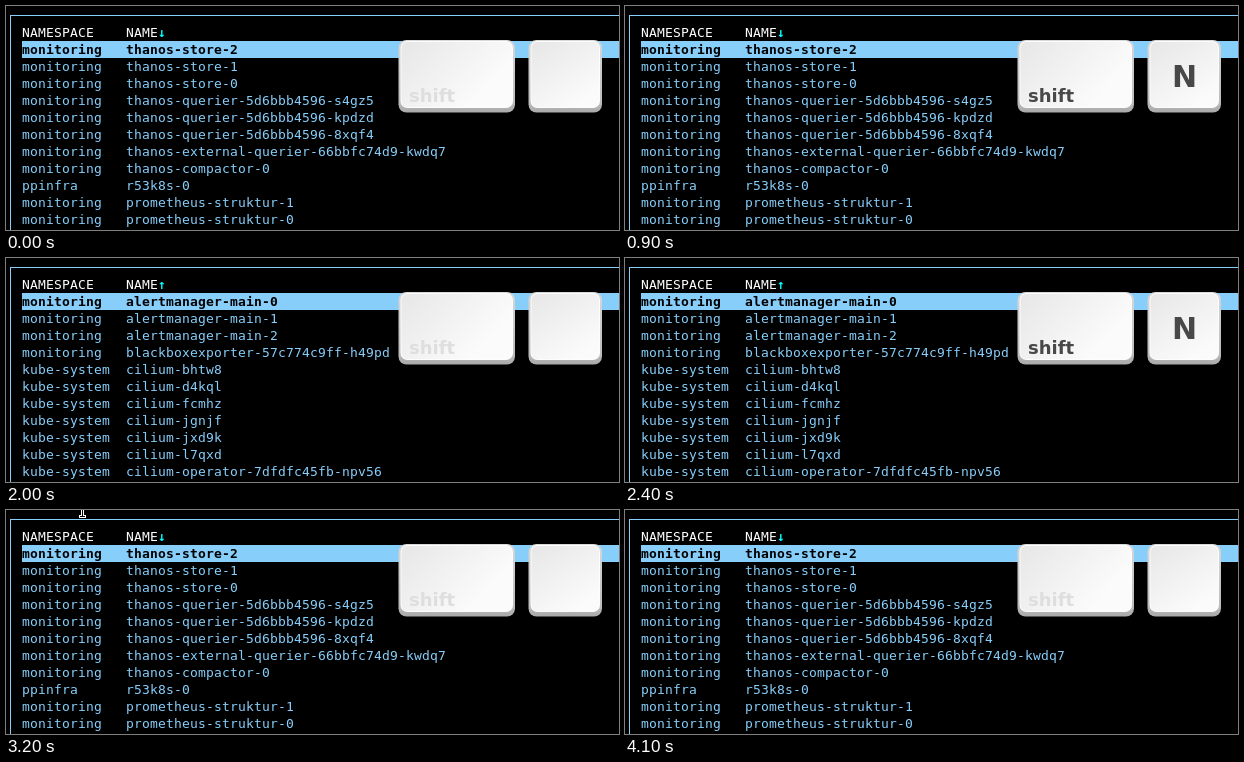
An HTML page with a canvas for the animation above (4.3 s loop, 613 by 224 pixels).

```html
<!DOCTYPE html>
<html lang="en">
<head>
<meta charset="utf-8">
<title>Sorting by name with Shift+N</title>
<style>
  html, body { margin: 0; width: 100%; height: 100%; overflow: hidden; background: #000; }
  canvas { display: block; }
</style>
</head>
<body>
<canvas id="stage" width="613" height="224"></canvas>
<script>
const ctx = document.getElementById('stage').getContext('2d');
const LOOP = 4300;
const SKY = '#87cefa';
const CELL = 8, LINE = 17;
const MONO = '13px "DejaVu Sans Mono", monospace';
const SANS = '"DejaVu Sans", sans-serif';

const descending = [
  'monitoring thanos-store-2',
  'monitoring thanos-store-1',
  'monitoring thanos-store-0',
  'monitoring thanos-querier-5d6bbb4596-s4gz5',
  'monitoring thanos-querier-5d6bbb4596-kpdzd',
  'monitoring thanos-querier-5d6bbb4596-8xqf4',
  'monitoring thanos-external-querier-66bbfc74d9-kwdq7',
  'monitoring thanos-compactor-0',
  'ppinfra r53k8s-0',
  'monitoring prometheus-struktur-1',
  'monitoring prometheus-struktur-0'
];
const ascending = [
  'monitoring alertmanager-main-0',
  'monitoring alertmanager-main-1',
  'monitoring alertmanager-main-2',
  'monitoring blackboxexporter-57c774c9ff-h49pd',
  'kube-system cilium-bhtw8',
  'kube-system cilium-d4kql',
  'kube-system cilium-fcmhz',
  'kube-system cilium-jgnjf',
  'kube-system cilium-jxd9k',
  'kube-system cilium-l7qxd',
  'kube-system cilium-operator-7dfdfc45fb-npv56'
];

const within = (t, ...spans) => spans.some(([from, to]) => t >= from && t < to);

// Terminal text sits on a fixed character grid.
function cells(text, x, y, color, bold) {
  ctx.font = (bold ? 'bold ' : '') + MONO;
  ctx.fillStyle = color;
  [...text].forEach((char, i) => ctx.fillText(char, x + i * CELL, y));
}

function drawTable(rows, arrow) {
  ctx.fillStyle = SKY;
  ctx.fillRect(4, 9, 609, 1);
  ctx.fillRect(4, 9, 1, 215);
  ctx.fillRect(16, 35, 597, LINE);
  cells('NAMESPACE', 16, 31, '#fff');
  cells('NAME', 120, 31, '#fff');
  cells(arrow, 152, 31, '#00ffff', true);
  rows.forEach((row, i) => {
    const [namespace, name] = row.split(' ');
    const y = 48 + i * LINE;
    const color = i ? SKY : '#000';
    cells(namespace, 16, y, color, !i);
    cells(name, 120, y, color, !i);
  });
}

function roundedBox(x, y, w, h, radius, fill) {
  ctx.beginPath();
  ctx.roundRect(x, y, w, h, radius);
  ctx.fillStyle = fill;
  ctx.fill();
}

function drawKey(x, width) {
  const side = ctx.createLinearGradient(0, 34, 0, 107);
  side.addColorStop(0, '#d8d8d8');
  side.addColorStop(0.85, '#bcbcbc');
  side.addColorStop(1, '#a8a8a8');
  roundedBox(x, 34, width, 72.5, 8, side);
  const face = ctx.createLinearGradient(x, 35, x + width * 0.6, 102);
  face.addColorStop(0, '#e6e6e6');
  face.addColorStop(1, '#fbfbfb');
  roundedBox(x + 2, 35, width - 4, 67, 7, '#fdfdfd');
  roundedBox(x + 3, 36, width - 6, 65, 6, face);
}

function label(text, x, y, size, color) {
  ctx.font = `bold ${size}px ${SANS}`;
  ctx.fillStyle = color;
  ctx.fillText(text, x, y);
}

function drawKeys(shiftDown, letterDown) {
  drawKey(392.5, 116.5);
  drawKey(522.5, 73.5);
  label('shift', 403, 96, 18, shiftDown ? '#484848' : '#dedede');
  if (letterDown) label('N', 547, 81, 30, '#484848');
}

// Text pointer, anchored at its lower end.
function drawPointer(x, bottom) {
  const shape = grow => {
    ctx.fillRect(x - grow, bottom - 15 - grow, 1 + 2 * grow, 14 + 2 * grow);
    for (const y of [bottom - 15, bottom - 1]) {
      ctx.fillRect(x - 2 - grow, y - grow, 5 + 2 * grow, 1 + 2 * grow);
    }
  };
  ctx.fillStyle = '#fff';
  shape(1);
  ctx.fillStyle = '#000';
  shape(0);
}

function draw(t) {
  ctx.fillStyle = '#000';
  ctx.fillRect(0, 0, 613, 224);
  const sortedUp = within(t, [1000, 2600]);
  drawTable(sortedUp ? ascending : descending, sortedUp ? '↑' : '↓');
  drawKeys(within(t, [600, 2000], [2100, 3100]), within(t, [900, 1500], [2400, 3000]));
  if (within(t, [3200, 3500])) {
    const step = Math.floor((t - 3200) / 100);
    drawPointer(76 + step, 7 - step * 2);
  }
}

const start = performance.now();
function tick() {
  draw((performance.now() - start) % LOOP);
  requestAnimationFrame(tick);
}
tick();
</script>
</body>
</html>
```
